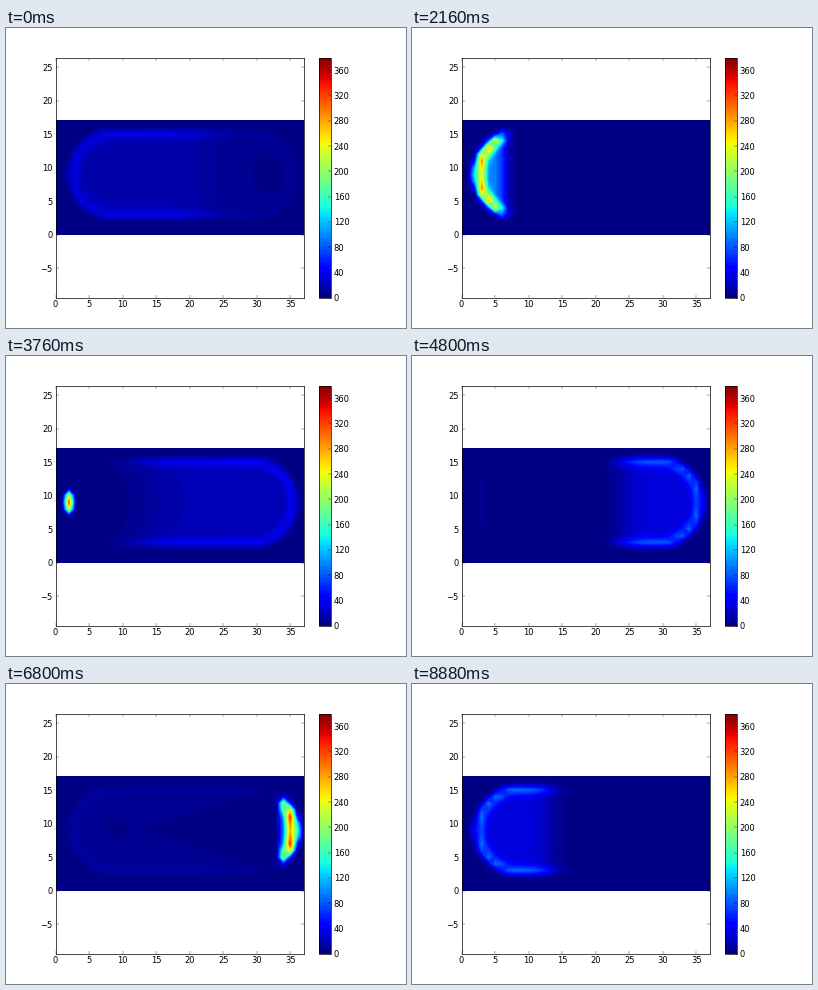
A matplotlib script that plays this animation: 400x300 px, repeating every 8.96 s.

```python
import numpy as np
import matplotlib.pyplot as plt
from matplotlib.animation import FuncAnimation

FRAMES, STEP = 112, 80
HALF = 3980              # ms between a left pulse and the next right one
TOP = 380
LEVELS = np.arange(0, TOP + 1, 4)

plt.rcParams.update({
    "font.family": "DejaVu Sans", "font.size": 12,
    "axes.linewidth": 1.0,
    "xtick.direction": "in", "ytick.direction": "in",
    "xtick.top": True, "ytick.right": True,
    "xtick.major.size": 4, "ytick.major.size": 4,
    "xtick.major.width": .5, "ytick.major.width": .5,
    "xtick.major.pad": 4, "ytick.major.pad": 4,
})

X, Y = np.meshgrid(np.arange(38.0), np.arange(18.0))
OFF = np.abs(Y - 9)


def logistic(v):
    return 1 / (1 + np.exp(np.clip(v, -60, 60)))


def smooth(v):
    v = np.clip(v, 0, 1)
    return v * v * (3 - 2 * v)


def blob(x, cx, r):
    return np.exp(-((x - cx) ** 2 + (Y - 9) ** 2) / r ** 2)


# Distance from the stadium's centre line
DIST = np.hypot(X - np.clip(X, 8.6, 29.4), OFF)
RING = np.exp(-.5 * ((DIST - 6) / np.where(DIST < 6, .5, .45)) ** 2)
FLOOR = logistic((DIST - 6.7) / .15)


def pulse(p, x):
    """Light gathering towards x = 2; p is the phase in ms."""
    reach = min(31, 22.5 * np.exp(-p / 1700))
    soft = max(.09 * reach - .15, .06)
    height = 65 * np.exp(p / 1450)
    height *= smooth((p + 2100) / 1900) * smooth((4400 - p) / 1000)
    spread = 4 * np.sqrt(max(reach - 2.3, .04))

    # early on the inside is flatter, with a dark wedge and a hole
    early = np.clip(-p / 1160, 0, 1)
    base = min(.8, .33 + .07 * np.exp(-p / 700))
    inner = reach - 18 * early ** 1.5 * np.clip(1 - OFF / 6, 0, 1)

    ring = (1 - base) * RING * logistic((x - reach) / soft)
    floor = base * FLOOR * logistic((x - inner) / soft)
    floor *= 1 - early ** 2 * blob(x, 9, 1.7)
    return height * (ring + floor) * np.exp(-(OFF / spread) ** 4)


def field(t):
    z = pulse(t, X) * min(1, .4 + t / 1500)
    for k in (1, 2):
        p = t - k * HALF
        if p > -2100:
            z = z + .73 * pulse(p, 38 - X if k % 2 else X)
    # fading even glow at the start
    glow = max(0, 1 - t / 1000)
    z = z + glow * (4 * RING + 5 * FLOOR * (1 - blob(X, 32, 2.4)))
    # weak remains beside the left focus
    rest = 7 * np.exp(-((t - 4700) / 1300) ** 4)
    z = z + rest * RING * np.exp(-((X - 3.2) / .7) ** 2)
    return np.clip(z, 0, TOP - .1)


fig = plt.figure(figsize=(8, 6), dpi=50, facecolor="white")


def add_axes(left, width):
    return fig.add_axes([left / 400, 30.4 / 300, width / 400, .8])


ax = add_axes(49.6, 248)
half_y = 120 * 37 / 248


def paint(t):
    return ax.contourf(X, Y, field(t), levels=LEVELS, cmap="jet",
                       vmin=0, vmax=TOP)


shown = [paint(0)]
ax.set_xlim(0, 37)
ax.set_ylim(8.5 - half_y, 8.5 + half_y)
ax.set_xticks(range(0, 36, 5))
ax.set_yticks(range(-5, 26, 5))

bar = fig.colorbar(shown[0], cax=add_axes(312.9, 12),
                   ticks=range(0, 361, 40))
bar.outline.set_linewidth(1)


def draw(i):
    shown[0].remove()
    shown[0] = paint(i * STEP)
    return [shown[0]]


anim = FuncAnimation(fig, draw, frames=FRAMES, interval=STEP,
                     init_func=lambda: draw(0), repeat=True,
                     repeat_delay=0, blit=False)
plt.show()
```
